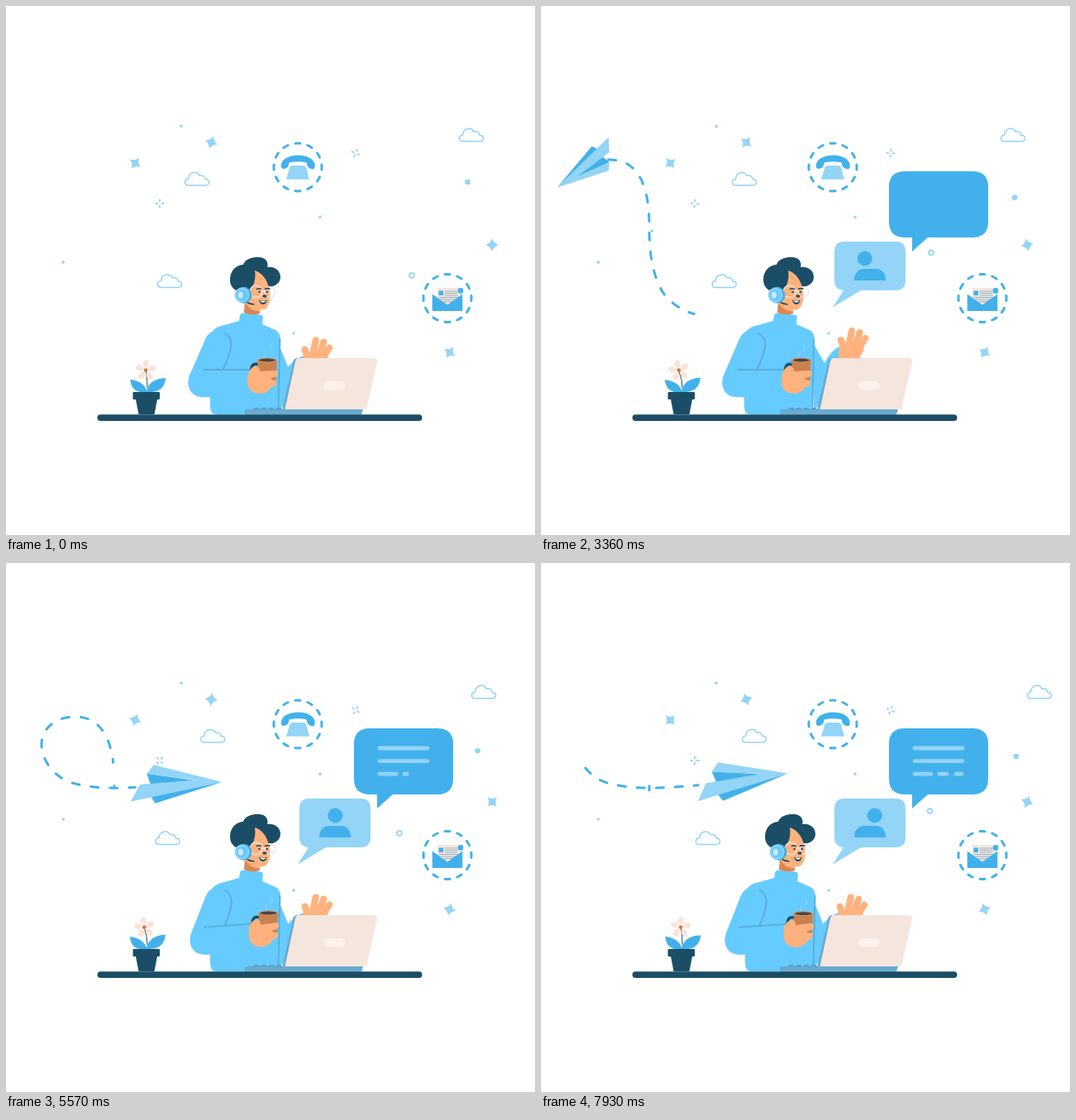
An HTML page that plays this animation: 640 by 640 pixels, repeating every 8 s.

```html
<!DOCTYPE html>
<html lang="en">
<head>
<meta charset="utf-8">
<title>Online support</title>
<style>
  html, body { margin: 0; width: 100%; height: 100%; overflow: hidden; background: #fff; }
  svg { display: block; width: 100vw; height: 100vh; }
  .sky { fill: #66cbff; }
  .blue { fill: #42b1eb; }
  .pale { fill: #93d4f7; }
  .navy { fill: #1b4e66; }
  .skin { fill: #ffb27d; }
  .cream { fill: #f5e6dd; }
  .steel { fill: #6aabd0; }
  .line { fill: none; stroke-linecap: round; stroke-linejoin: round; }
  .fold { stroke: #58add8; stroke-width: 1.8; }
  .ink { stroke: #1b4e66; stroke-width: 1.6; }
  .dash { stroke: #42b1eb; stroke-width: 3; }
  .thin { stroke: #93d4f7; stroke-width: 1.5; }
  .text { stroke: #93d4f7; stroke-width: 4.8; }
</style>
</head>
<body>
<svg viewBox="0 0 640 640">
  <defs>
    <path id="star" class="pale" d="M0-8Q1.8-1.8 8 0Q1.8 1.8 0 8Q-1.8 1.8-8 0Q-1.8-1.8 0-8Z"/>
    <path id="burst" class="line" stroke="#93d4f7" stroke-width="1.9" d="M0-2.8V-4.6M0 2.8V4.6M-2.8 0H-4.6M2.8 0H4.6"/>
    <path id="cloud" class="line thin" d="M4.5 15.4C-.9 15.4-.9 8 4.5 7.8C5-1 15.5-2.4 18 3.8C21.5 2.6 25 4.8 25 8C31 8 31 15.4 25.5 15.4Z"/>
    <circle id="ring" class="line dash" r="29" pathLength="120" stroke-dasharray="4 6" stroke-dashoffset="2" transform="rotate(-90)"/>
    <ellipse id="petal" fill="#fbe3d6" cy="-8" rx="3.5" ry="4.7"/>
    <path id="flight" d="M222 377C195 376 180 373 166 364C152 355 147 347 142 336C133 315 131 290 131 272C131 262 131 256 130 245C127 212 114 186 84 186C58 186 43 202 43 219C43 240 60 263 88 268C105 272 130 273 152 271.5C172 270.5 225 267 252 260"/>
    <mask id="trim" maskUnits="userSpaceOnUse" width="640" height="640">
      <use id="window" href="#flight" fill="none" stroke="#fff" stroke-width="8"/>
    </mask>
  </defs>

  <g id="scenery">
    <circle id="dot" class="pale" r="3.3"/>
    <circle id="hoop" class="line" stroke="#93d4f7" stroke-width="1.7" r="2.9"/>
  </g>

  <g>
    <use href="#ring" transform="translate(353 195)"/>
    <path class="pale" d="M347 193H360Q362.500 193 363.200 195.500L367 209.800H339L343.200 195.500Q344 193 347 193Z"/>
    <path id="handset" class="blue" d="M333 191C337 177 370 177 373.500 191Q374.500 197 371 197.500Q363.500 196 363.800 189.500Q353 187 342.500 189.500Q342.500 196 336 197Q332 197 333 191Z"/>
  </g>
  <g>
    <use href="#ring" transform="translate(534 353.500)"/>
    <path class="cream" d="M522 341H548V362H522Z"/>
    <path class="blue" d="M523.500 344.500H529V350H523.500Z"/>
    <path class="line" stroke="#8fb4c6" d="M531 345H546M531 347.500H546M531 350H546M524 352.500H546M526 355H544M530 357.500H540"/>
    <path class="blue" d="M515.700 348.500L534 361.500L552.300 348.500V369H515.700Z"/>
    <circle class="blue" cx="550" cy="344.500" r="3.400"/>
  </g>

  <g mask="url(#trim)">
    <use id="trail" href="#flight" class="line dash" stroke-dasharray="9 14"/>
  </g>
  <g id="plane">
    <path class="blue" d="M166 251L230 264L170 266ZM169 279L174 288L257 267Z"/>
    <path class="pale" d="M166 251L175 241L257 267L228 263ZM144 284L157 264L228 262.500L257 267Z"/>
  </g>

  <g id="contact">
    <path class="pale" d="M367 285H429Q441 285 441 297V332Q441 344 429 344H387L353 364.500L366 344Q355 343 355 332V297Q355 285 367 285Z"/>
    <g id="person" class="blue">
      <circle id="face" cy="305.500" r="9"/>
      <path d="M379 332C379 323 384 318 391 318H405C412 318 417 323 417 332Z"/>
    </g>
  </g>
  <g id="message">
    <path class="blue" d="M440 200H522Q541 200 541 219V261Q541 280 522 280H468L449 297V280H440Q421 280 421 261V219Q421 200 440 200Z"/>
    <g id="rows"></g>
  </g>

  <g>
    <path class="line" stroke="#1b4e66" id="stem"/>
    <g id="leaves" class="blue">
      <path d="M171 467C153 469 151 459 150 452C161 453 168 458 171 467Z"/>
      <path d="M170 467C171 456 181 450 193 450C192 460 187 468 170 467Z"/>
    </g>
    <g id="flower">
      <circle r="2.400" fill="#cf7c4b"/>
    </g>
    <path class="navy" d="M154.500 467H185Q186 467 186 468V475Q186 476 185 476H183L179.500 494H160.500L157 476H154.500Q153.500 476 153.500 475V468Q153.500 467 154.500 467Z"/>
  </g>

  <path id="sleeve" class="sky"/>
  <g id="wave">
    <path class="skin" d="M361 410L392 404Q391 419 386 424V440H360V420Z"/>
    <path class="line" stroke="#ffb27d" stroke-width="8" d="M363 404L367 416M376 393L372 412M385.500 395L379 413M392.500 402L383 416"/>
  </g>

  <g id="body">
    <path class="sky" d="M283 375Q284 371 288 371.500L308 373.500Q311 374 311 377L310 385L326 392Q332 395 332 403L330 494H254Q247 494 247 484V400Q249 391 257 388L282 381Z"/>
    <path class="line fold" d="M331.500 403L329.500 487"/>
    <g id="head">
      <path fill="#dc8650" d="M289 357L307 364V372Q298 375 288 371Z"/>
      <path class="skin" d="M288 357Q296 371 307 369V364L295 352Z"/>
      <path class="navy" d="M297 346C288 349 271 346 271 331C271 319 280 313 287 313C289 305 305 301 313 306C317 309 317 314 316 316C325 315 332 320 332 328C332 336 324 340 317 340Z"/>
      <path class="skin" d="M301 320C310 323 315 330 318 340C321 351 320 362 313 367C302 370 290 362 291 345C298 344 303 333 301 320Z"/>
      <g class="line" stroke="#f5e6dd" stroke-width="1.400">
        <circle cx="302.500" cy="345.500" r="7.300"/><circle cx="319.500" cy="346" r="6.300"/>
        <path d="M310 345H313"/>
      </g>
      <path class="line ink" d="M303.500 342.500Q306 341 308.500 342.500M313.500 342.500Q316 341 319 342"/>
      <circle class="navy" cx="306.500" cy="346" r="1.200"/><circle class="navy" cx="315.800" cy="346" r="1.200"/>
      <ellipse class="navy" cx="313" cy="351" rx="2.600" ry="1.800"/>
      <path class="navy" d="M306 355.500Q311 358 315.500 355.500Q315 361 310.500 361Q307 360.500 306 355.500Z"/>
      <path fill="#fff" d="M307 356.200Q311 358 314.500 356.200Q314 358.500 311 358.700Q308 358.500 307 356.200Z"/>
      <path class="line ink" d="M291 358Q295 361 300 361"/>
      <circle class="blue" cx="287.500" cy="349.700" r="10"/>
      <circle class="pale" cx="285.500" cy="349.700" r="9"/>
      <circle class="sky" cx="285.500" cy="349.700" r="7"/>
      <ellipse cx="283.800" cy="349.700" rx="3" ry="4" fill="#cde8f7"/>
    </g>

    <g id="arm">
      <path class="sky" d="M262 391C246 391 242 400 239 408L222 447C217 460 224 473 237 473L268 473L264 440Q276 413 272 405Q269 394 262 391Z"/>
      <path class="line fold" d="M265 396Q274 402 272 413Q270 424 263 439"/>
      <g id="forearm">
        <path class="sky" d="M238 440.500H298V472L293 473.300H237Z"/>
        <path class="line fold" d="M239 440H297"/>
        <g id="cup">
          <path id="steam" class="line" stroke="#a9dcf8" d="M313 425V418M319 417Q322 413 319 409"/>
          <path class="line" stroke="#1b4e66" stroke-width="3.400" d="M304 433.500Q296 431.500 297 443"/>
          <path fill="#c9824f" d="M304 428H328L326.500 455H306Z"/>
          <ellipse cx="316" cy="428.500" rx="12" ry="2.900" fill="#d8925f"/>
          <ellipse cx="316" cy="428.500" rx="10" ry="1.900" fill="#4b4547"/>
        </g>
        <path class="skin" d="M293 444Q298 434 304 436Q308 438 307 442L327 441Q332 445 326 449L320 450Q321 453 327 453Q329 460 321 461Q317 468 307 469Q292 468 292 454Z"/>
      </g>
    </g>
  </g>

  <g>
    <path class="steel" d="M291 488H432L430 494.500H289V490Q289 488 291 488ZM348 428L351 426H358L343 489H334Z"/>
    <path class="cream" d="M354 426H445Q450 426 449 431L436 488H337.500L350 430Q351 426 354 426Z"/>
    <rect x="384" y="454" width="26" height="10.500" rx="5" fill="#fbf0ea"/>
    <path class="line" stroke="#5a9dc3" stroke-width="2" d="M300 488Q303 486 306 488M309 488Q312 486 315 488M318 488Q321 486 324 488M327 488Q330 486 333 488"/>
    <rect class="navy" x="110.500" y="494.200" width="393" height="7.800" rx="3.900"/>
  </g>
</svg>
<script>
// All times are in seconds.
const LOOP = 8;
const TAU = 2 * Math.PI;
const $ = id => document.getElementById(id);
const updates = [];

const move = (el, value) => el.setAttribute('transform', value);
const show = (el, visible) => { el.style.display = visible ? '' : 'none'; };
const clamp = v => Math.min(1, Math.max(0, v));
const smooth = u => u * u * (3 - 2 * u);
const wave = (t, period, start) => Math.sin(TAU * (t - start) / period);

// Rise from 0 towards 1, fast at first and then ever slower.
const approach = (t, start, rate, power = 1) =>
  1 - Math.exp(-rate * Math.max(0, t - start) ** power);

// Ease between [time, value] waypoints, resting at each.
const route = (...points) => t => points.reduce((value, [time, next], i) => {
  if (i === 0) return next;
  const since = points[i - 1][0];
  return value + (next - points[i - 1][1]) * smooth(clamp((t - since) / (time - since)));
}, 0);

function add(parent, tag, attrs) {
  const el = document.createElementNS('http://www.w3.org/2000/svg', tag);
  for (const key in attrs) el.setAttribute(key, attrs[key]);
  return parent.appendChild(el);
}

function drift(el, x, y) {
  updates.push(t => move(el, `translate(${x(t)} ${y(t)})`));
}
function cloud(y, x) {
  drift(add($('scenery'), 'use', { href: '#cloud' }), x, () => y);
}
function spark(shape, x, y, angle, size = 1) {
  const el = add($('scenery'), 'use', { href: '#' + shape });
  updates.push(t => move(el, `translate(${x} ${y}) rotate(${angle(t)}) scale(${size})`));
}
const twinkle = phase => t => 22 + 22 * Math.sin(1.6 * t + phase);

cloud(148.4, route([0, 548], [2.6, 564], [4, 550], [8, 588]));
cloud(201.6, route([0, 216], [2.6, 240], [4, 224], [6.8, 243]));
cloud(325, route([0, 183], [2.3, 213], [6.2, 178], [8, 187]));
drift($('dot'), route([0, 558.5], [2.2, 575], [4.9, 570], [8, 575]),
  route([0, 213], [4, 233], [5.8, 227], [8, 234]));
drift($('hoop'), route([0, 491], [1.3, 478], [4, 471], [5.4, 476], [8, 470.5]),
  route([0, 326], [2.5, 291.5], [5.5, 327], [8, 300]));

spark('star', 156.4, 190, route([0, 35], [5.3, -70], [8, -45]));
spark('star', 248.4, 165, route([0, 18], [2.6, 45], [5.4, 5], [8, 70]));
spark('star', 588.2, 289, route([0, 0], [3.8, 80], [7, 22]));
spark('star', 536.8, 419, route([0, 35], [1.8, 0], [4.2, 45], [7, -20]));
[[212, 145.3], [380, 255.3], [69.2, 310], [348, 396]].forEach(([x, y]) =>
  spark('star', x, y, twinkle(x), .33));
spark('burst', 186, 239, twinkle(-1.5));
spark('burst', 423, 178, twinkle(0));

// The phone rings every four seconds.
updates.push(t => {
  const ring = Math.max(0, wave(t, 4, 1.43)) ** 8;
  move($('handset'), `translate(0 ${-2 * ring}) rotate(${2 * ring} 353 190)`);
});

// The plane flies along the curve; the dashed trail follows inside a moving window.
updates.push(t => {
  const flight = $('flight');
  const start = Math.max(0, 70 * (t - 2.85));
  const end = 510 * approach(t, 2.15, .63, 1.15);
  $('window').setAttribute('stroke-dasharray', `${Math.max(0, end - start)} 2000`);
  $('window').setAttribute('stroke-dashoffset', -start);
  $('trail').setAttribute('stroke-dashoffset', 4 * t - 25);
  show($('trail'), end > 0);

  const distance = 112 + 449 * approach(t, 2.3, .51, 1.3);
  const size = approach(t, 2.4, 1.5);
  const p = flight.getPointAtLength(distance);
  const a = flight.getPointAtLength(distance - 3), b = flight.getPointAtLength(distance + 3);
  const angle = Math.atan2(b.y - a.y, b.x - a.x) * 360 / TAU + 2.5;
  show($('plane'), size > 0);
  move($('plane'), `translate(${p.x} ${p.y}) rotate(${angle}) scale(${size}) translate(-200 -266)`);
});

// Speech bubbles grow from the tips of their tails.
function pop(id, x, y, start, duration, { overshoot = 0, twist = 0 } = {}) {
  updates.push(t => {
    const v = clamp((t - start) / duration) - 1;
    const size = 1 + (overshoot + 1) * v ** 3 + overshoot * v * v;
    show($(id), size > .001);
    move($(id), `translate(${x} ${y}) rotate(${twist * (1 - size)}) scale(${size}) translate(${-x} ${-y})`);
  });
}
pop('contact', 353, 364, .8, .6, { twist: 60 });
pop('person', 398, 318, 1.6, .4);
pop('message', 449, 297, 1.9, .75, { overshoot: .75 });
updates.push(t => $('face').setAttribute('cx', 398 - 6.5 * wave(t, 7.4, 1.8)));

// Rows of text are written one after another, the last in three pieces.
[[0, 450, 512], [1, 450, 512], [2, 450, 474], [2, 480, 493], [2, 500, 511]].forEach(([row, left, right]) => {
  const el = add($('rows'), 'path', { class: 'line text' });
  updates.push(t => {
    const front = Math.min(right, 450 + 62 * clamp((t - 3.62) / .75 - row));
    show(el, front > left);
    el.setAttribute('d', `M${left + 2} ${224 + row * 15.6}H${Math.max(left + 2, front - 2)}`);
  });
});

for (let i = 0; i < 5; i++) add($('flower'), 'use', { href: '#petal', transform: `rotate(${72 * i})` });
updates.push(t => {
  const sway = wave(t, 7.6, -1.6), x = 167.8 + 1.3 * sway;
  move($('flower'), `translate(${x} 440.6) rotate(${8 * sway - 5})`);
  move($('leaves'), `rotate(${sway} 171 467)`);
  $('stem').setAttribute('d', `M171 462Q171 452 ${x + .5} 443`);
});

const greeting = route([0, 0], [2.3, 1], [3.3, 1], [5.5, 0]);
const sipping = route([4.4, 0], [6.5, 1], [9.4, 0]);
updates.push(t => {
  const greet = greeting(t), sip = sipping(t), rest = 1 - greet;
  const x = -1.3 * rest - 12 * greet * rest, y = 11.5 * rest;
  move($('wave'), `translate(${x} ${y})`);
  $('sleeve').setAttribute('d', `M330 409L${343 - y * .15} ${432 + y * .4}Q${350 + x * .2} ${417 + y * .8} ${363 + x} ${411 + y}L380 440L345 470L330 491Z`);
  move($('body'), `translate(${-1.2 * greet} 0)`);
  move($('head'), `translate(${-.8 * greet ** 4} 0)`);
  move($('arm'), `rotate(${-3.5 * sip} 260 395)`);
  move($('forearm'), `rotate(${-3.8 * sip} 236 457)`);
  move($('cup'), `rotate(${16 * sip * (1 - sip)} 314 450)`);
  $('steam').style.opacity = .55 + .25 * wave(t, 2.6, 0);
});

function frame(now) {
  const t = now / 1000 % LOOP;
  updates.forEach(update => update(t));
  requestAnimationFrame(frame);
}
frame(0);
</script>
</body>
</html>
```
